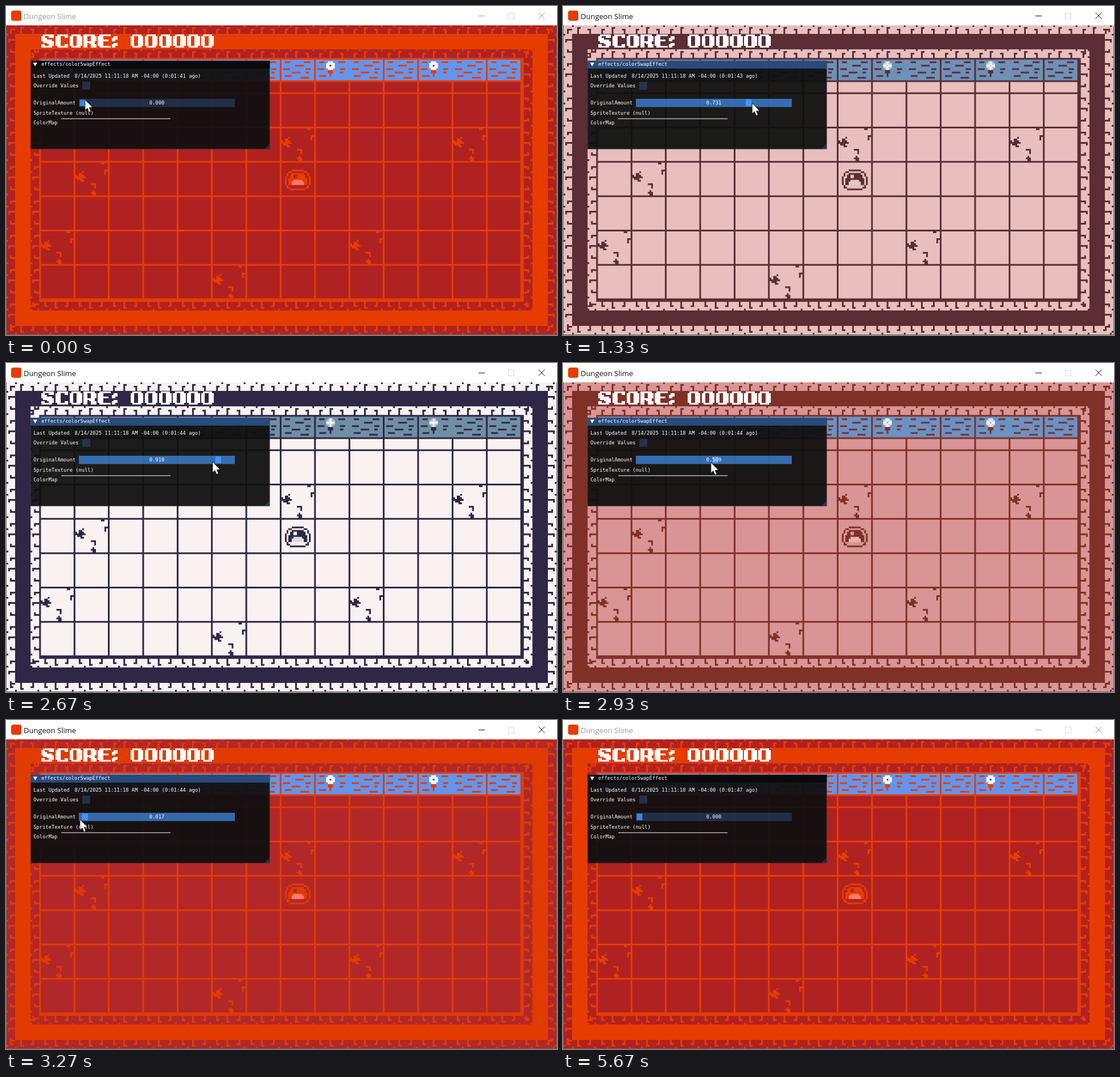
An HTML page with a canvas for the animation above (5.74 s loop, 968 px wide and 578 px high).

```html
<!DOCTYPE html>
<html lang="en">
<head>
<meta charset="utf-8">
<title>Dungeon Slime</title>
<style>
html, body { margin: 0; width: 100%; height: 100%; overflow: hidden; background: #fff; }
canvas { display: block; }
</style>
</head>
<body>
<canvas id="stage" width="968" height="578"></canvas>
<script>
const ctx = document.getElementById('stage').getContext('2d');
const scene = document.createElement('canvas');
scene.width = 1280;
scene.height = 720;
const game = scene.getContext('2d');
const LOOP = 5740, TEXEL = 4, TILE = 20;

// tick (1/15 s), slider value, palette mix, cursor x, cursor y
const KEYS = [
  [0, 0, 0, 139, 165], [1, 0, 0, 135, 165], [4, 0, 0, 135, 166],
  [12, .07, .07, 155, 168], [15, .2, .2, 191, 170], [17, .353, .353, 234, 171],
  [22, .983, .985, 398, 171], [23, 1, 1, 414, 171], [26, 1, 1, 429, 172],
  [30, 1, 1, 429, 172], [38, 1, 1, 398, 173], [40, .91, .97, 363, 174],
  [44, .509, .54, 260, 175], [49, .017, .03, 130, 175], [50, 0, 0, 118, 175],
  [55, 0, 0, 112, 176], [60, 0, 0, 112, 176], [69, 0, 0, 150, 590]
];

// palette pairs at mix 0 and mix 1
const PALETTE = {
  floor: [[176, 34, 34], [252, 247, 247]],
  line: [[231, 60, 0], [40, 39, 72]],
  water: [[100, 149, 237], [112, 143, 163]],
  mouth: [[255, 122, 107], [220, 224, 230]],
  petal: [[255, 255, 255], [176, 193, 205]]
};

const BRICK = [
  '..#.....#......#....',
  '..#.....#......#....',
  '..##....#.....##....',
  '........##..........',
  '.....#............#.'
];
const WAVES = [[1, 2, 3], [1, 13, 4], [3, 8, 5], [5, 1, 4], [5, 14, 3], [7, 6, 5], [7, 14, 2], [9, 2, 4], [10, 11, 5]];
const CRACK = [
  '...............##..',
  '', '', '',
  '.................##',
  '....#............#.',
  '..##.............#.',
  '#.###..............',
  '######.............',
  '.###...............',
  '...##..............',
  '',
  '.........###.......',
  '...........#.......',
  '...........#.......',
  '',
  '..........#........',
  '.........###.......',
  '..........##.......'
];
const CRACKS = [[8, 3], [13, 3], [2, 4], [1, 6], [10, 6], [6, 7]];
const SLIME = [
  '....#######....',
  '..##.......##..',
  '.#..#######..#.',
  '.#.##ee#####.#.',
  '#..##ee#####..#',
  '#.###########.#',
  '#.###mmmmm###.#',
  '#.##mmmmmmm##.#',
  '#.##mmmmmmm##.#',
  '.#...........#.',
  '.##.........##.',
  '...#########...'
];
const GLYPHS = {
  S: '.######/##..###/###..../######./.######/...####/##..###/######.',
  C: '.######/###..##/###..../###..../###..../###..../###..##/.######',
  O: '.#####./##..###/##..###/##..###/##..###/##..###/##..###/.#####.',
  R: '######./##..###/##..###/##..###/######./##.###./##..###/##..###',
  E: '.######/###..../###..../######./###..../###..../###..../.######',
  ':': '.../.##/###/##./.../.##/###/##.'
};
GLYPHS[0] = GLYPHS.O;

const lerp = (a, b, u) => a + (b - a) * u;

function pose(tick) {
  let i = 0;
  while (i < KEYS.length - 2 && KEYS[i + 1][0] <= tick) i++;
  const a = KEYS[i], b = KEYS[i + 1];
  const u = Math.min(1, (tick - a[0]) / (b[0] - a[0]));
  return a.slice(1).map((n, j) => lerp(n, b[j + 1], u));
}

function rect(x, y, w, h, color) {
  ctx.fillStyle = color;
  ctx.fillRect(x, y, w, h);
}

// rectangle in game texels
function block(x, y, w, h, color) {
  game.fillStyle = color;
  game.fillRect(x * TEXEL, y * TEXEL, w * TEXEL, h * TEXEL);
}

function sprite(rows, x, y, colors) {
  rows.forEach((row, j) => [...row].forEach((c, i) => {
    if (colors[c]) block(x + i, y + j, 1, 1, colors[c]);
  }));
}

// brick marks around a ring; inset is the distance of the ring from the edge
function bricks(inset, color) {
  BRICK.forEach((row, j) => {
    const near = inset + 4 - j;
    for (let i = inset; i < 320 - inset; i++) {
      if (row[i % TILE] !== '#') continue;
      block(i, near, 1, 1, color);
      block(i, 179 - near, 1, 1, color);
      if (i >= 180 - inset) continue;
      block(near, i, 1, 1, color);
      block(319 - near, i, 1, 1, color);
    }
  });
}

function room(mix) {
  const c = {};
  for (const name in PALETTE) {
    const [a, b] = PALETTE[name];
    c[name] = `rgb(${a.map((n, i) => Math.round(lerp(n, b[i], mix)))})`;
  }
  const { floor, line, water, mouth, petal } = c;

  block(0, 0, 320, 180, floor);
  block(5, 5, 310, 170, line);
  block(14, 14, 292, 152, floor);
  bricks(0, line);
  bricks(14, line);
  block(19, 19, 282, 142, line);

  for (let col = 1; col < 15; col++) {
    const x = col * TILE;
    for (let row = 2; row < 8; row++) block(x, row * TILE, 19, 19, floor);
    block(x, 33, 19, 6, floor);
    const wide = col === 9 || col === 12;
    block(x, 20, wide ? 20 : 19, 12, water);
    for (const [y, dx, w] of WAVES) {
      if (!wide || dx < 5 || dx > 12) block(x + dx, 20 + y, w, 1, line);
    }
    if (!wide) continue;
    block(x + 7, 21, 3, 5, petal);
    block(x + 6, 22, 5, 3, petal);
    block(x + 8, 21, 1, 5, '#fff');
    block(x + 6, 23, 5, 1, '#fff');
    block(x + 8, 23, 1, 1, floor);
    block(x + 7, 26, 3, 2, line);
    block(x + 8, 28, 1, 2, line);
  }
  for (const [col, row] of CRACKS) sprite(CRACK, col * TILE, row * TILE, { '#': line });
  sprite(SLIME, 162, 84, { '#': line, e: floor, m: mouth });
  ctx.imageSmoothingQuality = 'high';
  ctx.drawImage(scene, 1, 34, 966, 543);
}

function score() {
  const unit = 3.2, rowHeight = 2.9, pitch = 24.8;
  [...'SCORE: 000000'].forEach((ch, n) => {
    if (!GLYPHS[ch]) return;
    const left = n < 7 ? 62 + n * pitch : 219 + (n - 7) * pitch;
    GLYPHS[ch].split('/').forEach((row, j) => [...row].forEach((c, i) => {
      if (c !== '#') return;
      const x = Math.round(left + i * unit), y = Math.round(50 + j * rowHeight);
      rect(x, y, Math.round(left + (i + 1) * unit) - x, Math.round(50 + (j + 1) * rowHeight) - y, '#fff');
    }));
  });
}

function text(str, x, y, align = 'left') {
  ctx.textAlign = align;
  ctx.fillText(str, x, y);
}

function titleBar(active) {
  const ink = active ? '#111' : '#999';
  rect(0, 0, 968, 34, '#fff');
  ctx.fillStyle = '#e73c00';
  ctx.beginPath();
  ctx.roundRect(9, 8, 18, 18, 4);
  ctx.fill();
  ctx.font = '13px "Open Sans", sans-serif';
  ctx.textBaseline = 'alphabetic';
  ctx.fillStyle = ink;
  text('Dungeon Slime', 31, 23);
  rect(830, 17, 11, 1, ink);
  ctx.lineWidth = 1;
  ctx.strokeStyle = '#d8d8d8';
  ctx.strokeRect(882.5, 12.5, 10, 10);
  ctx.strokeStyle = ink;
  ctx.beginPath();
  ctx.moveTo(935.5, 11.5); ctx.lineTo(946.5, 22.5);
  ctx.moveTo(946.5, 11.5); ctx.lineTo(935.5, 22.5);
  ctx.stroke();
}

function polygon(points, color) {
  ctx.fillStyle = color;
  ctx.beginPath();
  points.forEach(([x, y]) => ctx.lineTo(x, y));
  ctx.closePath();
  ctx.fill();
}

function panel(value, tick, active, held) {
  const frame = 'rgba(41,74,122,.54)';
  rect(43, 96, 420.5, 155.5, 'rgba(15,15,15,.94)');
  rect(43, 96, 420.5, 14, active ? '#294a7a' : '#0a0a0a');
  ctx.lineWidth = 1;
  ctx.strokeStyle = 'rgba(110,110,128,.25)';
  ctx.strokeRect(43.5, 96.5, 419.5, 154.5);
  polygon([[463, 242], [463, 251], [454, 251]], 'rgba(66,150,250,.22)');
  polygon([[47.5, 99.5], [55, 99.5], [51.2, 106]], '#fff');
  rect(134, 133, 14, 14, frame);
  rect(128, 163, 274, 14.5, held ? 'rgba(66,150,250,.67)' : frame);
  rect(129.5 + value * 262, 164.5, 10, 11.5, held ? '#4296fa' : '#3d85e0');
  rect(97, 197.5, 192, 1, '#fff');

  const age = 41 + Math.floor((tick + 10) / 15);
  ctx.font = '8.775px "DejaVu Sans Mono", monospace';
  ctx.textBaseline = 'middle';
  ctx.fillStyle = '#fff';
  text('effects/colorSwapEffect', 62, 103);
  text('Last Updated', 48.3, 123.5);
  text(`8/14/2025 11:11:18 AM -04:00 (0:01:${age} ago)`, 120.6, 123.5);
  text('Override Values', 48.3, 141);
  text('OriginalAmount', 48.3, 171);
  text(value.toFixed(3), 265, 171, 'center');
  text('SpriteTexture (null)', 48.3, 188.5);
  text('ColorMap', 48.3, 205.5);
}

function pointer(x, y) {
  const shape = [[0, 0], [0, 18], [4, 14.5], [7, 21.5], [10, 20], [7.2, 13.5], [13, 13]];
  polygon(shape.map(([dx, dy]) => [x + dx, y + dy]), '#fff');
  ctx.lineWidth = .8;
  ctx.strokeStyle = 'rgba(0,0,0,.75)';
  ctx.stroke();
}

function draw(now) {
  const tick = Math.floor((now % LOOP) * .015 + .06);
  const [value, mix, x, y] = pose(tick);
  const active = tick >= 4 && tick < 70;
  const held = tick >= 4 && tick < 61;
  rect(0, 0, 968, 578, '#6b6b6b');
  room(mix);
  score();
  panel(value, tick, active, held);
  titleBar(active);
  // the recording ends without a cursor
  if (tick < 69) pointer(x, y);
}

const start = performance.now();
function loop() {
  draw(performance.now() - start);
  requestAnimationFrame(loop);
}
loop();
</script>
</body>
</html>
```
